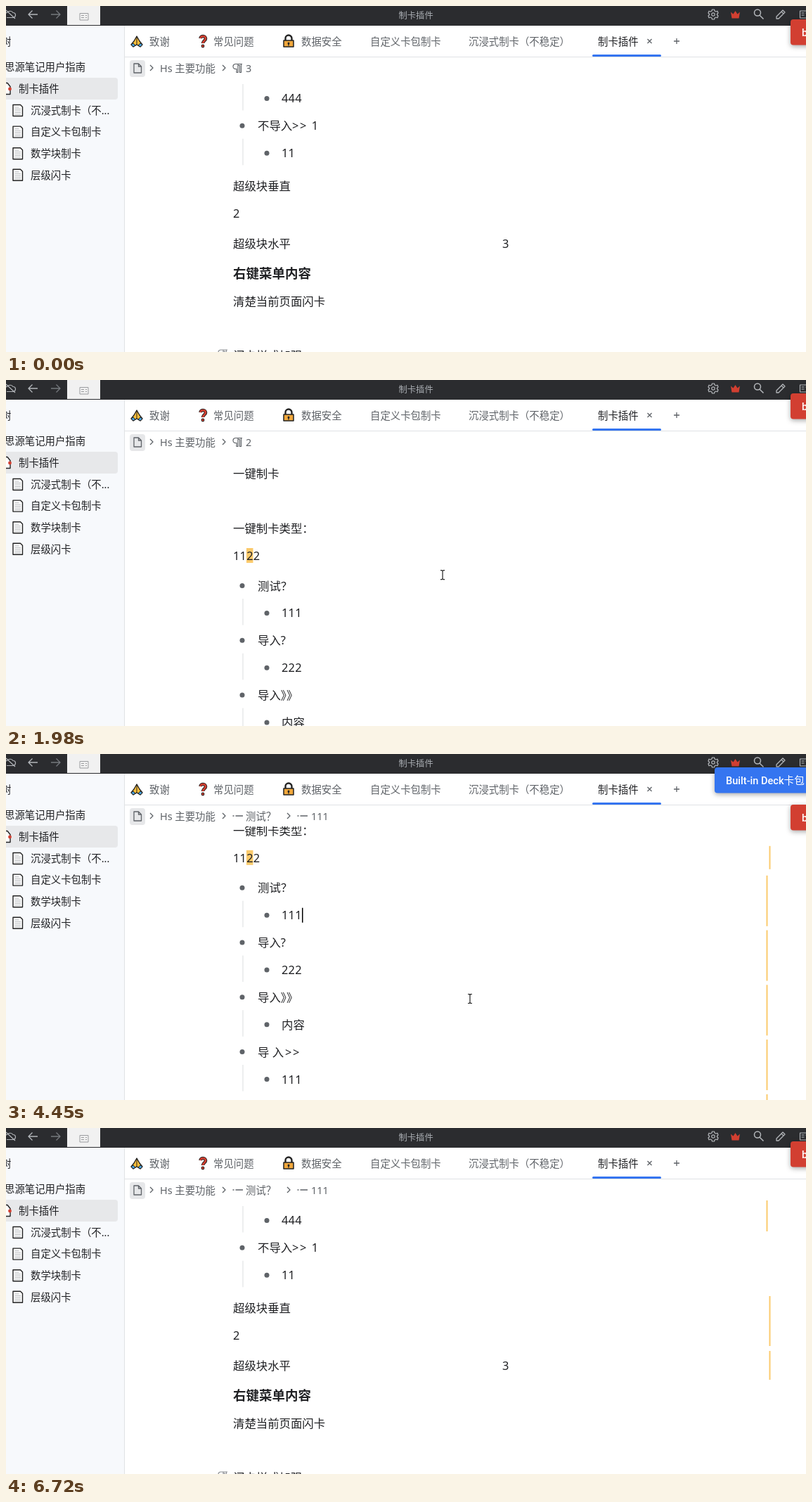
An HTML page with a canvas that plays this animation: 1138x492 px, repeating every 8650 ms.

```html
<!DOCTYPE html>
<html lang="zh-CN">
<head>
<meta charset="utf-8">
<style>
  html, body { margin: 0; width: 100%; height: 100%; overflow: hidden; background: #fff; }
  canvas { display: block; }
</style>
</head>
<body>
<canvas id="stage" width="1138" height="492"></canvas>
<script>
const c = document.getElementById('stage').getContext('2d');
const LOOP = 8650, STEP = 102.2;
const INK = '#202124', GREY = '#5f6368', BLUE = '#3575f0', RED = '#d23f31', AMBER = '#fbca6c';
const SANS = '"Noto Sans", "Noto Sans CJK SC", sans-serif';
const TOAST_FONT = 'Roboto, "Noto Sans CJK SC", sans-serif';

// [time, wheel steps from the top]
const SCROLL = [[0, 5], [600, 4], [990, 3], [1180, 2], [1520, 1], [1720, 0],
  [4450, 1], [4590, 2], [4640, 3], [4910, 4], [5040, 5]];

// [time, x, y]
const POINTER = [[0, 1062, 502], [70, 1046, 486], [400, 711, 302], [600, 711, 302], [730, 719, 344],
  [1850, 719, 344], [2250, 420, 140], [2640, 144, 28], [2720, 144, 28], [2860, 112, 17],
  [3250, 112, 17], [3580, 412, 203], [3640, 412, 203], [3840, 660, 348], [5260, 660, 348], [5650, 1088, 502]];

const LIST = [['测试？', '111'], ['导入?', '222'], ['导入》》', '内容'], ['导 入', '111', '>>', 397],
  ['导入', '444', '||', 391], ['不导入', '11', '>> 1', 407]];

function text(str, x, y, size = 16.4, color = INK, { weight = 400, font = SANS, gap = 0 } = {}) {
  c.font = `${weight} ${size}px ${font}`;
  c.letterSpacing = gap + 'px';
  c.fillStyle = color;
  c.fillText(str, x, y + size * 0.37);
}

function rect(x, y, w, h, color, r = 0) {
  c.fillStyle = color;
  c.beginPath();
  c.roundRect(x, y, w, h, r);
  c.fill();
}

function dot(x, y, r, color) {
  c.fillStyle = color;
  c.beginPath();
  c.arc(x, y, r, 0, 7);
  c.fill();
}

// Draws an SVG path centred on x, y.
function icon(d, x, y, color, width = 1.3, fill) {
  c.save();
  c.translate(x, y);
  c.lineWidth = width;
  c.lineJoin = 'round';
  const path = new Path2D(d);
  if (fill) { c.fillStyle = fill; c.fill(path); }
  if (color) { c.strokeStyle = color; c.stroke(path); }
  c.restore();
}

const chevron = (x, y) => icon('M-2-4L2 0L-2 4', x, y, GREY);
const pilcrow = (x, y, color) =>
  icon('M7-6H-2.5A3.5 3.5 0 0 0-2.5 1H-1V6H1V-6M1-4H3.5V6H5.5V-6', x, y, color, 1.2);

const stepAt = (keys, t) => keys.findLast(k => k[0] <= t)[1];

function pathAt(keys, t) {
  const i = keys.findLastIndex(k => k[0] <= t);
  const [t0, x0, y0] = keys[i], [t1, x1, y1] = keys[i + 1] || [LOOP, x0, y0];
  const p = (t - t0) / (t1 - t0);
  return [x0 + (x1 - x0) * p, y0 + (y1 - y0) * p];
}

function drawDocument(t) {
  c.save();
  c.beginPath();
  c.rect(169, 103, 969, 389);
  c.clip();
  c.translate(0, -stepAt(SCROLL, t) * STEP);

  text('一键制卡', 323, 133);
  text('一键制卡类型：', 323, 211);
  rect(342, 239, 9.5, 21, AMBER);
  text('1122', 323, 250, 16.4, INK, { gap: 0.2 });

  LIST.forEach(([title, child, tail, tailX], i) => {
    const y = 292.5 + i * 77.75, sub = y + 38.9;
    dot(336, y, 3.5, GREY);
    text(title, 358, y);
    if (tail) text(tail, tailX, y, 16.4, INK, { gap: tail === '||' ? -4 : 1.6 });
    rect(336.5, sub - 20.5, 1, 37.5, '#dcdee0');
    dot(371, sub, 3.5, GREY);
    text(child, 392, sub, 16.4, INK, { gap: child === '内容' ? 0 : 0.2 });
  });

  text('超级块垂直', 323, 767);
  text('2', 323, 806);
  text('超级块水平', 323, 848.5);
  text('3', 706, 848.5);
  text('右键菜单内容', 323, 891, 18.5, INK, { weight: 700 });
  text('清楚当前页面闪卡', 323, 931);
  text('闪卡样式加强', 323, 1008);

  if (t >= 2200 && t < 3720) pilcrow(308, 133, '#8a8d91');
  if (t < 600 || t >= 5580) pilcrow(308, 1006, '#8a8d91');
  if (t >= 4050) rect(421, 321, 1.5, 21, '#000');

  if (t >= 3300) {
    for (let i = 0; i < 5; i++) rect(1081.5, 275 + i * 77.75, 2, 72, AMBER);
    for (const [y, h] of [[233, 33], [750, 71], [828, 41]]) rect(1085.5, y, 2, h, AMBER);
  }
  c.restore();
}

function drawBreadcrumb(t) {
  rect(176, 77, 22, 24, '#e6e7e9', 4);
  icon('M-5-6.5H1.5L5.5-2.5V6.5H-5ZM1.5-6.5V-2.5H5.5', 187, 88.5, GREY);
  chevron(207, 88);
  text('Hs 主要功能', 219, 88.5, 14.4, GREY);
  chevron(310, 88);
  if (t < 4050) {
    pilcrow(329, 88.5, GREY);
    text(t < 670 ? '3' : '2', 341, 88.5, 14.4, GREY);
    return;
  }
  const item = 'M-7.5 0H-5.5M-3.5 0H7';
  icon(item, 330, 88, GREY, 1.6);
  text('测试？', 341, 88.5, 14.4, GREY);
  chevron(402, 88);
  icon(item, 422, 88, GREY, 1.6);
  text('111', 434, 88.5, 14.4, GREY);
}

function drawTabs() {
  rect(169, 72, 969, 1, '#e0e2e5');
  icon('M0-8L-4-1L-8 4L-5 7L0 4L5 7L8 4L4-1Z', 186, 51, '#222', 1.4, '#fcbf3b');
  icon('M-8 4L-5 7L-2 5L-5 2ZM8 4L5 7L2 5L5 2Z', 186, 51, '#222', 1, '#4aa3dd');
  icon('M0-7V4', 186, 51, '#222', 1);
  icon('M-3.5-4C-3-8 4-8 4-3.5C4-1 0 0 0 3', 280, 50, '#222', 4.6);
  icon('M-3.5-4C-3-8 4-8 4-3.5C4-1 0 0 0 3', 280, 50, RED, 2.6);
  dot(280, 57, 2.4, '#222');
  dot(280, 57, 1.4, RED);
  icon('M-4.5 0V-4A4.5 4.5 0 0 1 4.5-4V0', 402, 50, '#222', 2.4);
  icon('M-7-1H7V8H-7Z', 402, 50, '#222', 1.5, '#f1a83c');
  dot(402, 53, 1.5, '#222');
  rect(401.3, 53, 1.4, 3.5, '#222');

  [['致谢', 204], ['常见问题', 295], ['数据安全', 420], ['自定义卡包制卡', 518], ['沉浸式制卡（不稳定）', 658]]
    .forEach(([label, x]) => text(label, x, 50.5, 14.4, GREY));
  text('制卡插件', 842, 50.5, 14.4, INK);
  rect(834, 69, 98, 3, BLUE, 1.5);
  icon('M-3-3L3 3M3-3L-3 3', 915.5, 50, GREY);
  icon('M-4 0H4M0-4V4', 954, 50, GREY);
}

function drawSidebar(toolsShown) {
  rect(0, 28, 168, 464, '#f7f9fc');
  rect(168, 28, 1, 464, '#e0e2e5');
  text('树', -7, 50.5, 14.4);
  if (toolsShown) {
    icon('M-6-3V-6H-3M3-6H6V-3M6 3V6H3M-3 6H-6V3', 49, 50, GREY, 1.5);
    dot(49, 50, 2, GREY);
    icon('M6-6L1-1M1-5V-1H5M-6 6L-1 1M-1 5V1H-5', 82, 50, GREY, 1.4);
    for (const dy of [-4, 0, 4]) dot(115, 50 + dy, 1.2, GREY);
    rect(141, 49.5, 13, 1.3, GREY);
  }
  text('思源笔记用户指南', -2, 87, 14.4);
  rect(-6, 102, 165, 31, '#e7e8ea', 4);
  icon('M-8-8H2L6-3V8H-8Z', 0, 117.5, '#222', 1.4, '#fff');
  dot(5.5, 118, 2.4, RED);
  text('制卡插件', 18, 117.5, 14.4);
  ['沉浸式制卡（不...', '自定义卡包制卡', '数学块制卡', '层级闪卡'].forEach((label, i) => {
    const y = 148.5 + i * 30.6;
    icon('M-6.5-8H4L7-5V8H-6.5Z', 16.5, y, '#222', 1.4, '#fff');
    icon('M-4-4.5H2M-4-2H4.5M-4 .5H4.5M-4 3H4.5M-4 5.5H4.5', 16.5, y, '#b5b8bb', 1);
    text(label, 35, y, 14.4);
  });
}

function drawTitleBar(pressed) {
  const LIGHT = '#b4b7bb', BAR = '#2b2c2f';
  rect(0, 0, 1138, 28, BAR);
  icon('M-5 4.5H4A3.5 3.5 0 0 0 4-2.5A5 5 0 0 0-4-3A4 4 0 0 0-6 4M-6-6L7 6', 6, 12, LIGHT, 1.2);
  icon('M6.5 0H-6M-1-5.5L-6.5 0L-1 5.5', 38.5, 12, LIGHT);
  icon('M-6.5 0H6M1-5.5L6.5 0L1 5.5', 70.5, 12, '#76797d');
  rect(87, 0, 47, 27, '#f1f1f1');
  if (pressed) rect(95, 0, 32, 27, BAR);
  icon('M-6-5H6V4.5H-6ZM-4-2H0M-4 1H0M2-2H4M2 1H4', 111, 15.5, pressed ? LIGHT : '#9a9c9f', 1);
  text('制卡插件', 558.5, 13, 12.3, '#a9adb2');

  icon('M-1.5-7H1.5L2-5L4-4L6-4.8L7-2L5.5-.5V.5L7 2L6 4.8L4 4L2 5L1.5 7H-1.5L-2 5L-4 4L-6 4.8L-7 2L-5.5 .5V-.5L-7-2L-6-4.8L-4-4L-2-5Z',
    1006, 12, LIGHT, 1.2);
  icon('M-2.2 0A2.2 2.2 0 1 0 2.2 0A2.2 2.2 0 1 0-2.2 0', 1006, 12, LIGHT, 1.2);
  icon('M-6.5-4L-3-1L0-5.5L3-1L6.5-4L5 5H-5Z', 1037.5, 12.5, null, 0, RED);
  icon('M3-2A4.5 4.5 0 1 0-6-2A4.5 4.5 0 1 0 3-2M1.7 1.7L7 7', 1070.5, 11.5, LIGHT, 1.5);
  icon('M-6 6V3L3-6L6-3L-3 6ZM1-4L4-1', 1102, 12, LIGHT);
  icon('M-6-5H6V5H-6ZM-4-2H0M-4 1H0M2-2H4', 1135.5, 12, LIGHT, 1.1);
}

function drawToast(x, y, color, label, textX) {
  c.save();
  c.shadowColor = 'rgba(0,0,0,.35)';
  c.shadowBlur = 7;
  c.shadowOffsetY = 2;
  rect(x, y, 200, 36.5, color, 4);
  c.restore();
  text(label, x + textX, y + 18.5, 14.6, '#fff', { weight: 500, font: TOAST_FONT });
}

function drawPointer(x, y) {
  if (x > 168 && y > 103) {
    const beam = 'M-3-6.5H-1L0-5.5L1-6.5H3M0-5.5V5.5M-3 6.5H-1L0 5.5L1 6.5H3';
    icon(beam, x, y, '#fff', 2.6);
    icon(beam, x, y, '#222', 1.2);
  } else {
    icon('M0 0V14L3.3 11L5.6 16L7.8 15L5.6 10.2H10Z', x, y, '#111', 1, '#fff');
  }
}

function draw(t) {
  const [px, py] = pathAt(POINTER, t);
  c.fillStyle = '#fff';
  c.fillRect(0, 0, 1138, 492);
  drawDocument(t);
  drawBreadcrumb(t);
  drawTabs();
  drawSidebar(px < 168 && py > 27);
  drawTitleBar(t >= 2860 && t < 3720);

  drawToast(1116, t >= 3510 && t < 6720 ? 72 : 19, RED, 'b', 16);
  const shown = Math.min((t - 3650) / 130, (6510 - t) / 90, 1);
  if (shown > 0) drawToast(1008 + 135 * (1 - shown), 19, BLUE, 'Built-in Deck卡包', 16);
  drawPointer(px, py);
}

function tick() {
  draw(performance.now() % LOOP);
  requestAnimationFrame(tick);
}
tick();
</script>
</body>
</html>
```
